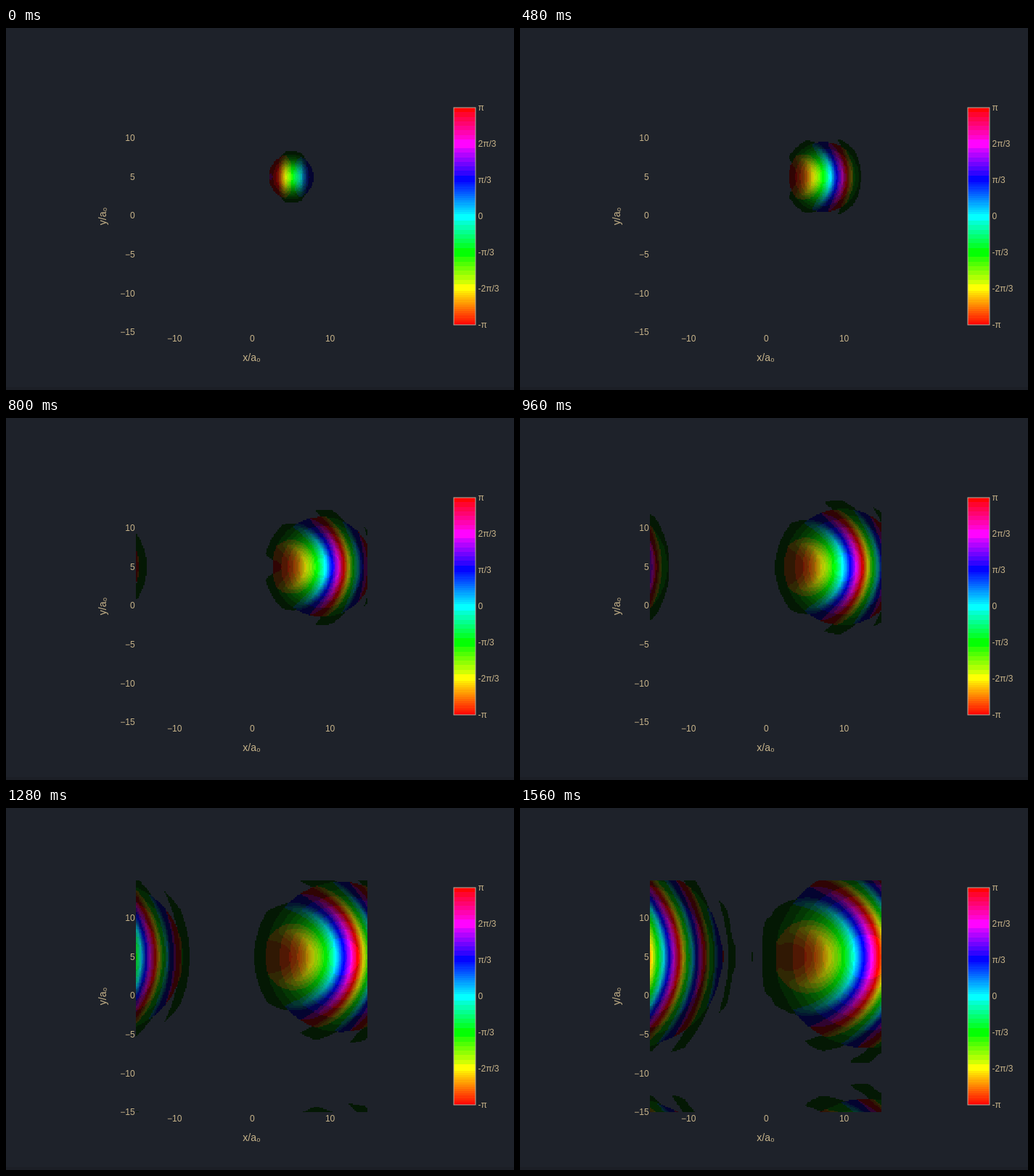
Write an HTML page with a canvas that moves like this. It is 700 px wide and 500 px high and loops after 1.6 s.

```html
<!DOCTYPE html>
<html lang="en">
<head>
<meta charset="utf-8">
<title>Wave packet on a periodic grid</title>
<style>
  html, body { margin: 0; width: 100%; height: 100%; overflow: hidden; background: #1e222a; }
  canvas, svg { position: absolute; left: 0; top: 0; width: 700px; height: 500px; display: block; }
  text { font-family: "Liberation Sans", Arial, sans-serif; font-size: 12px; fill: #c8b48a; }
  .title { font-size: 14px; text-anchor: middle; }
</style>
</head>
<body>
<canvas id="plot" width="700" height="500"></canvas>
<svg id="axes" viewBox="0 0 700 500" xmlns="http://www.w3.org/2000/svg">
  <rect y="496" width="700" height="4" fill="#1c1f26"/>
  <rect x="617" y="110" width="30" height="300" fill="none" stroke="#b5ab9c" stroke-width="1"/>
  <text class="title" x="338.5" y="460">x/a₀</text>
  <text class="title" transform="translate(138 260) rotate(-90)">y/a₀</text>
</svg>
<script>
const N = 200, SIZE = 30, DX = SIZE / N;
const LEFT = 179, TOP = 100, W = 319, H = 320;
const SCALE = 10.72, X0 = 339.4, Y0 = 259.2;
const START = 5, K = 1, STEP = 0.2, STEPS = 40, STEP_MS = 40;
const BG = [30, 34, 42];

const ctx = document.getElementById('plot').getContext('2d');
const heat = ctx.createImageData(W, H);

// Coarse colour levels: 8 for red and blue, 16 for green
function level(v, size) {
  const n = Math.floor(v / size);
  if (n === 0) return 0;
  return (n + 1) * size > 255 ? 255 : (n + 0.5) * size;
}

function color(phase, amp) {
  const h = (phase / Math.PI + 1) * 3;
  const channel = off => {
    const d = Math.abs(((h - off) % 6 + 9) % 6 - 3);
    return 255 * amp * Math.min(1, Math.max(0, 2 - d));
  };
  const r = level(channel(0), 32), g = level(channel(2), 16), b = level(channel(4), 32);
  return r + g + b === 0 ? BG : [r || 4, g || 4, b || 4];
}

// Free Gaussian packet along one axis, summed over its periodic images
function packet(t, k) {
  const tau = t / 2, spread = 1 + tau * tau, beta = t / (4 + t * t);
  const re = [], im = [];
  for (let i = 0; i < N; i++) {
    re[i] = im[i] = 0;
    for (let n = -1; n <= 2; n++) {
      const p = -SIZE / 2 + i * DX + n * SIZE;
      const u = p - START - k * t;
      const amp = Math.exp(-u * u / (4 * spread));
      const phase = k * p - k * k * t / 2 + beta * u * u / 2 - Math.atan(tau) / 2;
      re[i] += amp * Math.cos(phase);
      im[i] += amp * Math.sin(phase);
    }
  }
  return { re, im };
}

const cell = v => Math.min(N - 1, Math.max(0, Math.round((v + SIZE / 2) / DX)));
const cols = Array.from({ length: W }, (_, i) => cell((LEFT + i + 0.5 - X0) / SCALE));
const rows = Array.from({ length: H }, (_, j) => cell((Y0 - TOP - j - 0.5) / SCALE));

function drawPacket(t) {
  const a = packet(t, K), b = packet(t, 0);
  const grid = [];
  for (let j = 0; j < N; j++) {
    for (let i = 0; i < N; i++) {
      const re = a.re[i] * b.re[j] - a.im[i] * b.im[j];
      const im = a.re[i] * b.im[j] + a.im[i] * b.re[j];
      const amp = Math.min(1, Math.hypot(re, im));
      grid.push(amp < 0.05 ? BG : color(Math.atan2(im, re), amp));
    }
  }
  let o = 0;
  for (const j of rows) {
    for (const i of cols) {
      const c = grid[j * N + i];
      heat.data[o++] = c[0];
      heat.data[o++] = c[1];
      heat.data[o++] = c[2];
      heat.data[o++] = 255;
    }
  }
  ctx.putImageData(heat, LEFT, TOP);
}

function drawBar() {
  for (let y = 0; y < 300; y++) {
    ctx.fillStyle = `rgb(${color(Math.PI * (1 - (y + 0.5) / 150), 1)})`;
    ctx.fillRect(617, 110 + y, 30, 1);
  }
}

function label(str, x, y, anchor) {
  const el = document.createElementNS('http://www.w3.org/2000/svg', 'text');
  el.setAttribute('x', x);
  el.setAttribute('y', y);
  el.setAttribute('text-anchor', anchor);
  el.textContent = str;
  document.getElementById('axes').append(el);
}

const num = v => String(v).replace('-', '−');
for (let v = -15; v <= 10; v += 5) label(num(v), 177.6, Y0 - v * SCALE + 4.2, 'end');
for (let v = -10; v <= 10; v += 10) label(num(v), X0 + v * SCALE, 433, 'middle');
['π', '2π/3', 'π/3', '0', '-π/3', '-2π/3', '-π'].forEach((s, i) => label(s, 650.5, 114.2 + i * 50, 'start'));

ctx.fillStyle = `rgb(${BG})`;
ctx.fillRect(0, 0, 700, 500);
drawBar();

let shown = -1;
const begin = performance.now();
function tick() {
  const step = Math.floor((performance.now() - begin) / STEP_MS) % STEPS;
  if (step !== shown) {
    shown = step;
    drawPacket(step * STEP);
  }
  requestAnimationFrame(tick);
}
tick();
</script>
</body>
</html>
```
